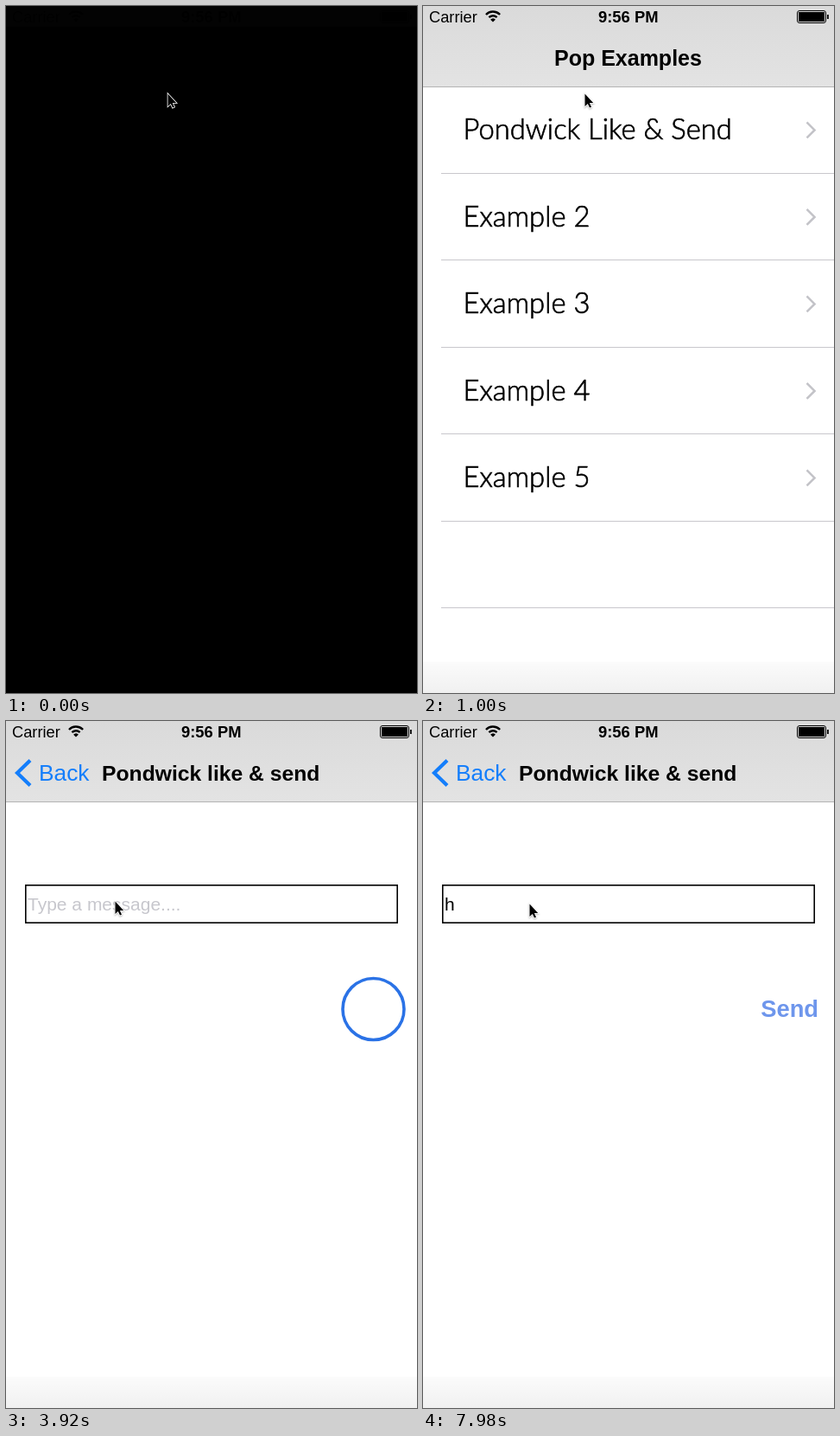
An HTML page with a canvas for the animation above (8000 ms loop, 476 by 794 pixels).

```html
<!DOCTYPE html>
<html lang="en">
<head>
<meta charset="utf-8">
<title>Pop Examples</title>
<style>
  html, body { margin: 0; width: 100%; height: 100%; overflow: hidden; background: #000; }
  canvas { display: block; }
</style>
</head>
<body>
<canvas id="stage" width="476" height="794"></canvas>
<script>
const W = 476, H = 794, LOOP = 8000;
const SHOW = 640, PUSH = 2260, FOCUS = 5060, TYPED = 7100;
const TINT = '#147efb', BLUE = '#2a72e6';
const SANS = '"Liberation Sans", Arial, sans-serif';
const LIGHT = 'Lato, "Open Sans", sans-serif';
const ROWS = ['Pondwick Like & Send', 'Example 2', 'Example 3', 'Example 4', 'Example 5'];
// Pointer stops: time, x, y
const PATH = [[0, 187, 101], [1250, 187, 101], [1540, 165, 143], [3100, 165, 143],
  [3850, 126, 208], [4000, 126, 208], [4500, 131, 212], [5200, 123, 211], [LOOP, 123, 211]];

const ctx = document.getElementById('stage').getContext('2d');
const clamp = v => Math.min(1, Math.max(0, v));

function text(str, x, y, font, color = '#000', alpha = 1) {
  ctx.globalAlpha = alpha;
  ctx.font = font;
  ctx.fillStyle = color;
  ctx.fillText(str, x, y);
  ctx.globalAlpha = 1;
}

function rect(x, y, w, h, color) {
  ctx.fillStyle = color;
  ctx.fillRect(x, y, w, h);
}

function line(points, color, width) {
  ctx.beginPath();
  points.forEach(([x, y]) => ctx.lineTo(x, y));
  ctx.strokeStyle = color;
  ctx.lineWidth = width;
  ctx.stroke();
}

function shade(y, h, from, to) {
  const g = ctx.createLinearGradient(0, y, 0, y + h);
  g.addColorStop(0, from);
  g.addColorStop(1, to);
  rect(0, y, W, h, g);
}

function scaled(x, y, s, draw) {
  ctx.save();
  ctx.translate(x, y);
  ctx.scale(s, s);
  ctx.translate(-x, -y);
  draw();
  ctx.restore();
}

// Light face, thickened slightly
function rowLabel(str, x, y) {
  text(str, x, y, '300 33.8px ' + LIGHT);
  ctx.strokeStyle = '#000';
  ctx.lineWidth = 0.7;
  ctx.strokeText(str, x, y);
}

function list(t, pushed) {
  const rowH = pushed ? 66 : 100.5;
  const left = pushed ? 21 : 41;
  const tau = Math.max(t, SHOW) - 820;
  const s = pushed ? 1 : 1 + 0.115 * Math.exp(-tau / 200) * Math.cos(tau * Math.PI / 250);
  for (let i = 0; 93 + rowH * (i + 1) < 755; i++) {
    rect(21, Math.round(92.4 + rowH * (i + 1)), W - 21, 1, '#c8c7cc');
    if (!ROWS[i]) continue;
    const mid = 92.7 + rowH * (i + 0.5);
    scaled(223, mid, s, () => rowLabel(ROWS[i], left, mid + 11.6));
    line([[444.5, mid - 8.5], [453.5, mid + 0.5], [444.5, mid + 9.5]], '#c3c3c8', 2.6);
  }
}

function caret(t) {
  const start = t < TYPED ? FOCUS : TYPED;
  if (t < start) return;
  ctx.globalAlpha = clamp((650 - (t - start) % 1000) / 100);
  rect(t < TYPED ? 25 : 37, 197, 3, 26, '#2f6fd0');
  ctx.globalAlpha = 1;
}

function detail(t) {
  rect(0, 0, W, H, '#fff');
  ctx.strokeStyle = '#000';
  ctx.lineWidth = 1.6;
  ctx.strokeRect(22.8, 189.8, 430.4, 43.4);
  const typed = t >= TYPED;
  text(typed ? 'h' : 'Type a message....', 25, 219, '21px ' + SANS, typed ? '#000' : '#c7c7cd');
  caret(t);
  if (typed) {
    const tau = t - TYPED;
    const s = 1 - Math.exp(-tau / 165) * Math.cos(tau * Math.PI / 220);
    scaled(425, 332, s, () => text('Send', 391, 342, 'bold 27.5px ' + SANS, '#6e96ec'));
  } else {
    ctx.beginPath();
    ctx.arc(425.5, 333, 35.5, 0, 7);
    ctx.strokeStyle = BLUE;
    ctx.lineWidth = 3.6;
    ctx.stroke();
  }
}

function statusBar() {
  text('Carrier', 7, 19, '18.3px ' + SANS);
  text('9:56 PM', 203, 19, 'bold 18.4px ' + SANS);
  ctx.strokeStyle = '#000';
  ctx.lineWidth = 2.4;
  for (const r of [6.3, 11]) {
    ctx.beginPath();
    ctx.arc(81, 17.5, r, -Math.PI * 0.76, -Math.PI * 0.24);
    ctx.stroke();
  }
  ctx.beginPath();
  ctx.moveTo(81, 18.5);
  ctx.arc(81, 18.5, 4, -Math.PI * 0.76, -Math.PI * 0.24);
  ctx.fillStyle = '#000';
  ctx.fill();
  ctx.lineWidth = 1;
  ctx.beginPath();
  ctx.roundRect(433.5, 5.5, 33, 14, 2.5);
  ctx.stroke();
  rect(435, 7, 30, 11, '#000');
  rect(468, 10, 1.8, 5, '#000');
}

// left: share of the push still to go, from 1 to 0
function navBar(left) {
  shade(0, 93, '#dadada', '#e3e3e3');
  rect(0, 93, W, 1, '#b4b4b4');
  statusBar();
  const shown = 1 - left;
  text('Pop Examples', 152 - 109 * shown, 69, 'bold 25px ' + SANS, '#000', left);
  if (!shown) return;
  text('Pondwick like & send', 111 + 425 * left, 69, 'bold 24.7px ' + SANS, '#000', shown);
  text('Back', 38 + 170 * left, 69, '26.3px ' + SANS, TINT, shown);
  ctx.globalAlpha = shown ** 12;
  line([[28, 45.5], [13, 60], [28, 74.5]], TINT, 4.2);
  ctx.globalAlpha = 1;
}

function pointer(t) {
  const i = PATH.findIndex(p => p[0] > t);
  const [t0, x0, y0] = PATH[i - 1], [t1, x1, y1] = PATH[i];
  const k = (t - t0) / (t1 - t0), e = k * k * (3 - 2 * k);
  ctx.save();
  ctx.translate(x0 + (x1 - x0) * e, y0 + (y1 - y0) * e);
  const arrow = new Path2D('M.5 .5V14.9L3.8 11.9 6 16.6 8 15.7 5.9 11H10.2Z');
  ctx.shadowColor = 'rgba(0,0,0,.3)';
  ctx.shadowBlur = 2;
  ctx.shadowOffsetY = 1;
  ctx.strokeStyle = '#fff';
  ctx.lineWidth = 1.6;
  ctx.stroke(arrow);
  ctx.shadowColor = 'transparent';
  ctx.fillStyle = '#000';
  ctx.fill(arrow);
  ctx.restore();
}

function draw(t) {
  const pushed = t >= PUSH;
  const x = Math.max(0, t - PUSH) * 0.0127;
  const left = t > 3080 ? 0 : (1 + x) * Math.exp(-x);
  rect(0, 0, W, H, '#fff');
  if (left) {
    ctx.save();
    ctx.translate(-0.3 * W * (1 - left), 0);
    list(t, pushed);
    ctx.restore();
  }
  if (pushed) {
    rect(0, 0, W, H, `rgba(0,0,0,${0.1 * (1 - left)})`);
    ctx.save();
    ctx.translate(Math.round(W * left), 0);
    detail(t);
    ctx.restore();
  }
  shade(758, 36, 'rgba(0,0,0,.015)', 'rgba(0,0,0,.06)');
  navBar(left);
  // Fade in from black; the status strip stays faintly visible
  const light = clamp((t - SHOW) / 242);
  rect(0, 0, W, 24, `rgba(0,0,0,${1 - Math.max(light, 0.015)})`);
  rect(0, 24, W, H, `rgba(0,0,0,${1 - light})`);
  pointer(t);
}

function tick(now) {
  draw(now % LOOP);
  requestAnimationFrame(tick);
}
draw(0);
requestAnimationFrame(tick);
</script>
</body>
</html>
```
